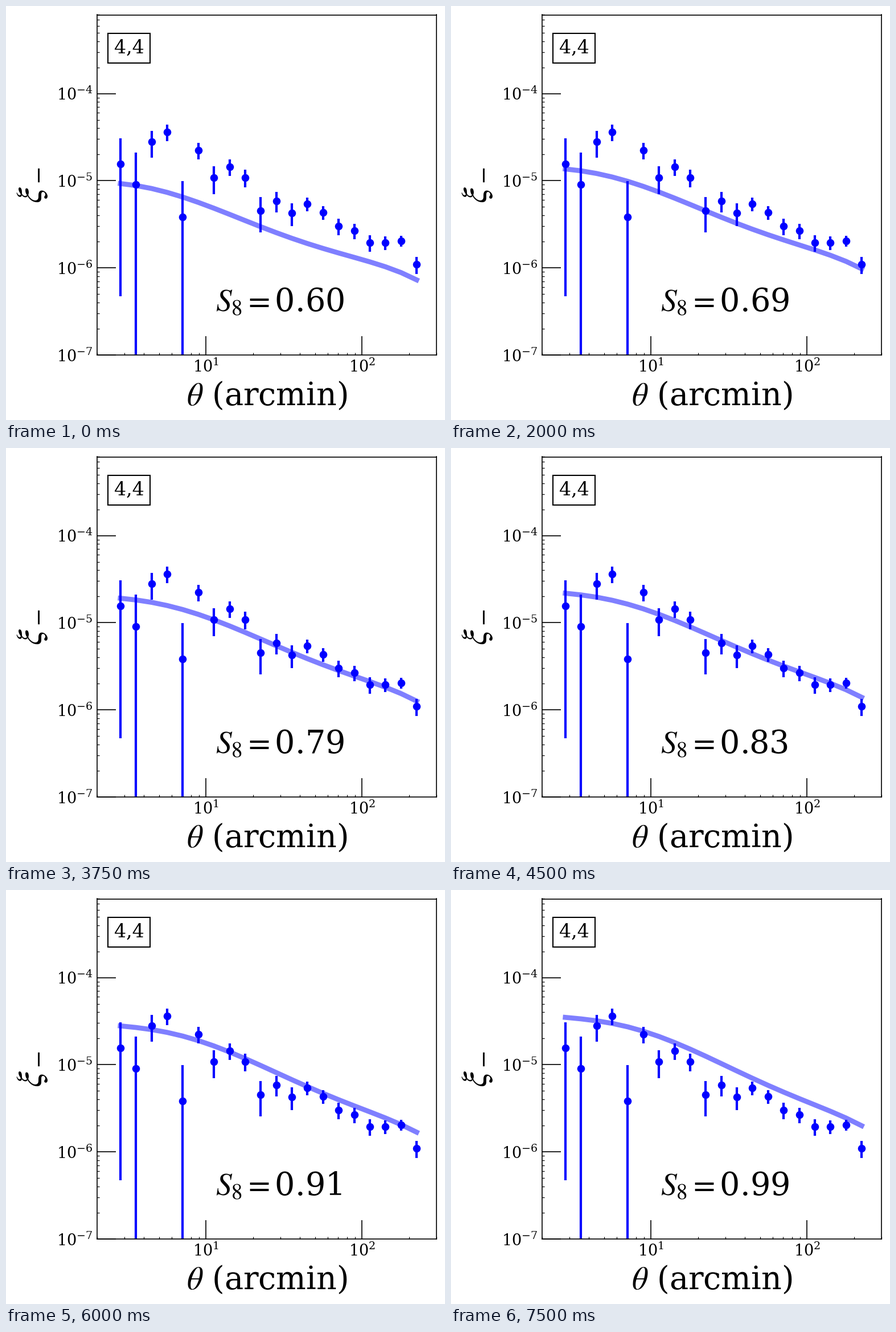
Recreate the animation shown at these times as a matplotlib script. Size 771 px wide and 726 px high, loop 7.75 s.

```python
import numpy as np
import matplotlib.pyplot as plt
from matplotlib.animation import FuncAnimation
from matplotlib.patches import Rectangle

W, H, DPI = 771, 726, 150
LEFT, RIGHT, TOP, BOTTOM = 160, 756, 15.5, 612
STEPS = 30          # distinct values of S8; the first one is held twice as long
INTERVAL = 250
S8_MIN, S8_MAX = 0.6, 1.0

plt.rcParams.update({
    "font.family": "DejaVu Serif",
    "mathtext.fontset": "stix",
    "axes.linewidth": 0.8,
})

BINS = np.arange(20)
THETA = 10 ** (0.45 + 0.1 * BINS)

# Measured points; the error is shot noise falling with theta plus a floor
XI = 1e-6 * np.array([15.5, 9.07, 27.8, 36.2, 3.82, 22.4, 10.9, 14.4, 10.9, 4.5,
                      5.86, 4.27, 5.43, 4.33, 3.02, 2.66, 1.95, 1.95, 2.04, 1.09])
SIGMA = 1e-6 * np.hypot(15.03 * 10 ** (-0.0985 * BINS), 0.13)


def s8_at(step):
    return S8_MIN + (S8_MAX - S8_MIN) * step / STEPS


def through(levels):
    """Smooth curve over all bins through a few evenly spread key points."""
    keys = [0, 3, 7, 11, 15, 19]
    return np.polyval(np.polyfit(keys, levels, 5), BINS)


# log10(xi) for the lowest and the highest S8 shown
LOW = through([-5.033, -5.134, -5.386, -5.661, -5.880, -6.138])
HIGH = through([-4.457, -4.526, -4.745, -5.072, -5.389, -5.700])
INDEX = (HIGH - LOW) / np.log10(s8_at(STEPS - 1) / S8_MIN)


def model(s8):
    """Each bin grows as a power of S8."""
    return 10 ** LOW * (s8 / S8_MIN) ** INDEX


fig = plt.figure(figsize=(W / DPI, H / DPI), dpi=DPI, facecolor="white")


def label(x, y, text, size, **kw):
    """Text with its baseline at pixel (x, y), y measured downwards."""
    return fig.text(x / W, 1 - y / H, text, fontsize=size, va="baseline", **kw)


ax = fig.add_axes([LEFT / W, 1 - BOTTOM / H,
                   (RIGHT - LEFT) / W, (BOTTOM - TOP) / H])
ax.set_xscale("log")
ax.set_yscale("log", nonpositive="clip")
ax.set_xlim(2, 300)
ax.set_ylim(1e-7, 8e-4)
ax.tick_params(which="both", direction="in")
ax.tick_params(which="major", length=16, width=0.8, labelsize=13)
ax.tick_params(which="minor", length=2, width=0.6)

ax.errorbar(THETA, XI, yerr=SIGMA, fmt="o", color="blue",
            ms=6.5, mew=0, elinewidth=2, capsize=0)
curve, = ax.plot(THETA, model(S8_MIN), color="blue", alpha=0.5, lw=4.2,
                 solid_capstyle="projecting")

fig.add_artist(Rectangle((179 / W, 1 - 99.5 / H), 74 / W, 52 / H,
                         fill=False, ec="black", lw=1))
label(216.3, 82.5, "4,4", 16, ha="center")
label(458, 700, r"$\theta$ (arcmin)", 26.7, ha="center")
label(62.5, 313.8, r"$\xi_-$", 30, ha="center", rotation=90,
      rotation_mode="anchor")
readout = label(368, 535, "", 26.7, ha="left")


def draw(slot):
    s8 = s8_at(max(slot - 1, 0))
    curve.set_ydata(model(s8))
    readout.set_text(f"$S_8=${s8:.2f}")
    return curve, readout


anim = FuncAnimation(fig, draw, frames=STEPS + 1, interval=INTERVAL,
                     repeat=True, repeat_delay=0, blit=False)
plt.show()
```
